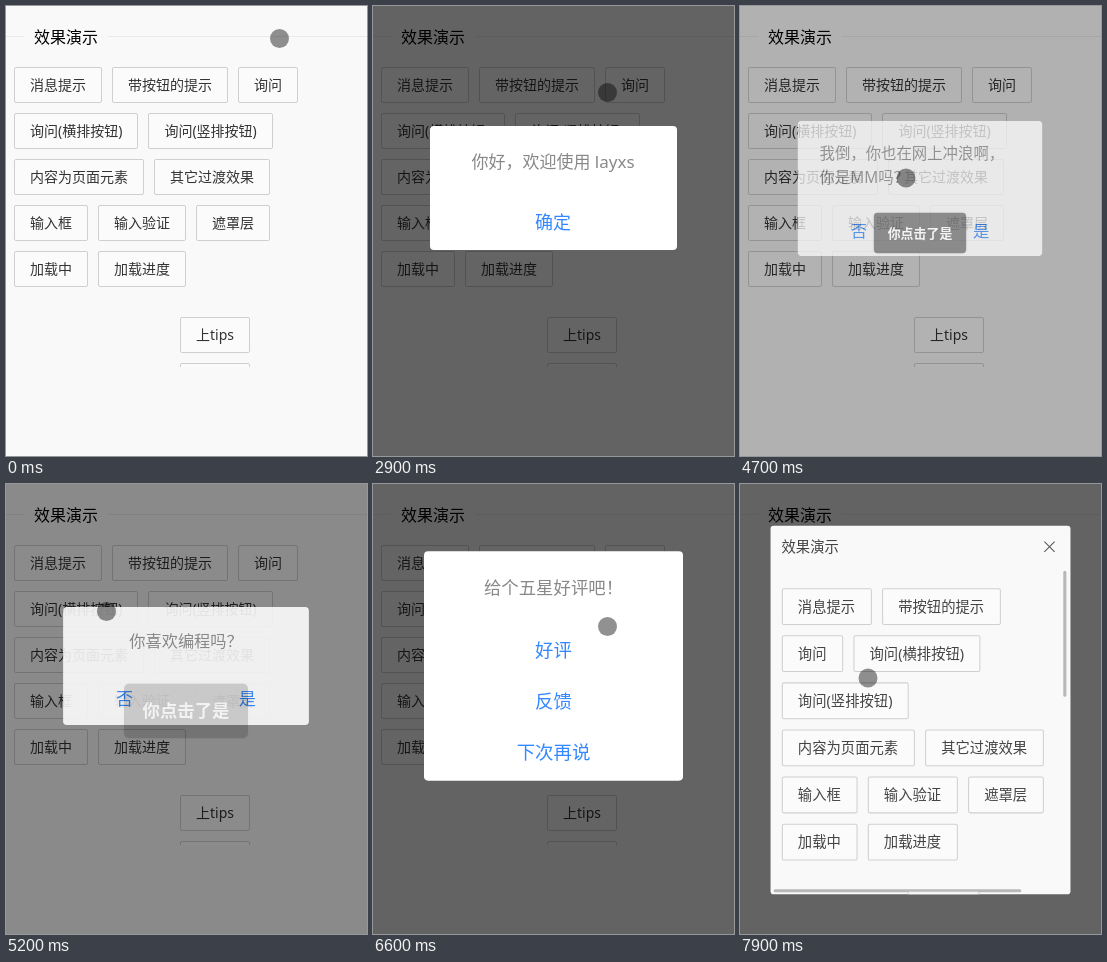
An HTML page that plays this animation: 361x450 px, repeating every 8000 ms.

```html
<!DOCTYPE html>
<html lang="zh-CN">
<head>
<meta charset="utf-8">
<title>效果演示</title>
<style>
* { box-sizing: border-box; }
html, body { margin: 0; width: 100%; height: 100%; overflow: hidden; background: #f9f9f9; }
#stage {
  position: relative; width: 361px; height: 450px; overflow: hidden; background: #f9f9f9;
  font: 14px/1 "Noto Sans", "Noto Sans CJK SC", "Noto Sans CJK", sans-serif; color: #333;
}
#stage div { position: absolute; white-space: nowrap; }
#list { left: 0; top: 0; width: 361px; height: 361px; overflow: hidden; }
.line { top: 30px; height: 1px; background: #e9e9e9; }
#head { left: 28px; top: 19px; font-size: 16px; line-height: 24px; color: #000; }
.row { display: flex; gap: 10px; height: 36px; }
#stage .btn {
  position: static; flex: none; padding: 0 15px; border: 1px solid #cfcfcf; border-radius: 2px;
  background: #fbfbfb; line-height: 34px;
}
#mask { inset: 0; background: #000; }
.dialog { border-radius: 4px; background: #fff; }
#stage .msg { left: 24px; right: 24px; top: 23px; font-size: 17px; line-height: 25.5px; color: #888; text-align: center; white-space: pre; }
#stage .msg.long { text-align: left; }
.act { height: 50px; line-height: 44px; font-size: 18px; color: #38f; text-align: center; }
#win { left: 33.5px; top: 46.4px; width: 292.6px; height: 360px; border-radius: 3px; background: #f9f9f9; overflow: hidden; color: #444; }
#win .name { left: 10.7px; top: 10px; line-height: 21px; }
#win svg { position: absolute; left: 266px; top: 14px; }
.bar { border-radius: 2px; background: #b8b8b8; }
.toast {
  top: 205px; height: 44px; border-radius: 4px; background: rgba(0,0,0,.8); color: #fff;
  line-height: 44px; text-align: center; font-weight: 700; box-shadow: 0 0 4px rgba(0,0,0,.12);
}
#dot { left: -9.5px; top: -9.5px; width: 19px; height: 19px; border-radius: 50%; background: rgba(0,0,0,.43); }
</style>
</head>
<body>
<div id="stage">
  <div class="line" style="left:0;width:18px"></div>
  <div class="line" style="left:102px;right:0"></div>
  <div id="head">效果演示</div>
  <div id="list"></div>
  <div id="mask"></div>
  <div id="win">
    <div class="name">效果演示</div>
    <svg width="13" height="13"><path d="M1.5 1.5l10 10m0-10l-10 10" stroke="#555"/></svg>
    <div class="bar" style="left:286px;top:44px;width:3px;height:123px"></div>
    <div class="bar" style="left:3px;top:354.5px;width:242px;height:3px"></div>
  </div>
</div>
<script>
const LOOP = 8000, STEP = 100;
const [stage, list, win, mask] = ['stage', 'list', 'win', 'mask'].map(id => document.getElementById(id));
const clamp = v => Math.min(1, Math.max(0, v));

function add(parent, cls, text = '', box = {}) {
  const el = document.createElement('div');
  el.className = cls;
  el.textContent = text;
  for (const k in box) el.style[k] = box[k] + 'px';
  parent.append(el);
  return el;
}

function addRows(parent, left, top, rows) {
  rows.forEach((labels, i) => {
    const row = add(parent, 'row', '', { left, top: top + i * 46 });
    labels.split(' ').forEach(s => add(row, 'btn', s));
  });
}

const common = ['内容为页面元素 其它过渡效果', '输入框 输入验证 遮罩层', '加载中 加载进度'];
addRows(list, 8, 61, ['消息提示 带按钮的提示 询问', '询问(横排按钮) 询问(竖排按钮)', ...common]);
addRows(list, 174, 311, ['上tips', '下tips']);
addRows(win, 10.7, 60.5, ['消息提示 带按钮的提示', '询问 询问(横排按钮)', '询问(竖排按钮)', ...common]);
addRows(win, 134, 357, ['上tips']);

function dialog(width, lines, acts, stacked) {
  const top = 48 + 25.5 * lines.length;
  const height = top + 50 * (stacked ? acts.length : 1);
  const el = add(stage, 'dialog', '', { left: 180 - width / 2, top: 182 - height / 2, width, height });
  add(el, lines.length > 1 ? 'msg long' : 'msg', lines.join('\n'));
  const w = stacked ? width : width / acts.length;
  acts.forEach((s, i) => add(el, 'act', s, stacked
    ? { left: 0, top: top + i * 50, width: w }
    : { left: i * w, top, width: w }));
  return el;
}

const toast = (text, width) => add(stage, 'toast', text, { left: 180.3 - width / 2, width });

// Element, opening time, closing time
const dialogs = [
  [dialog(247, ['你好，欢迎使用 layxs'], ['确定']), 2300, 3500],
  [dialog(270, ['我倒，你也在网上冲浪啊，', '你是MM吗？'], ['否', '是']), 3900, 4600],
  [dialog(258, ['你喜欢编程吗？'], ['否', '是']), 5100, 5800],
  [dialog(253, ['给个五星好评吧！'], ['好评', '反馈', '下次再说'], true), 6300, 7000],
  [win, 7600, LOOP]
];
const toasts = [
  [toast('你好，欢迎使用 layxs', 165), 400, 2200],
  [toast('你点击了是', 100), 4600, 5000],
  [toast('你点击了是', 100), 5800, 6200],
  [toast('非常感谢', 86), 7000, 7500]
];

// Pointer stops: arrival time, x, y
const stops = [
  [0, 273, 32], [300, 71.5, 79.5], [800, 188, 71.5], [3100, 326, 115], [3400, 226, 215],
  [3700, 292, 110], [3900, 265, 82], [4400, 241, 226], [4700, 165.5, 171.5], [4900, 100, 127],
  [5600, 244, 212], [6000, 274.5, 140.5], [6200, 215, 127], [6800, 272, 172],
  [7200, 268.5, 186], [7500, 75, 173], [7900, 127.5, 193.5]
];
const dot = add(stage, '');
dot.id = 'dot';

// Rises past 1 and settles
const back = u => 1 + 3 * (u - 1) ** 3 + 2 * (u - 1) ** 2;

// How far open a dialog is: 0 hidden, 1 at rest
function openness(t, open, close) {
  if (t <= open) return 0;
  return t <= close ? Math.max(0, back(clamp((t - open) / 500))) : (1 - clamp((t - close) / 235)) ** 1.3;
}

function pose(el, scale, opacity) {
  el.style.transform = `scale(${scale})`;
  el.style.opacity = opacity;
  el.style.visibility = opacity > 0 ? 'visible' : 'hidden';
}

function pointer(t) {
  const i = stops.findIndex(s => s[0] > t);
  if (i < 0) return stops[stops.length - 1].slice(1);
  const [t0, x0, y0] = stops[i - 1], [t1, x1, y1] = stops[i];
  const from = Math.max(t0, t1 - 300), p = clamp((t - from) / (t1 - from));
  return [x0 + (x1 - x0) * p, y0 + (y1 - y0) * p];
}

function draw(t) {
  let shade = 0;
  for (const [el, open, close] of dialogs) {
    const m = openness(t, open, close);
    pose(el, .815 + .185 * m, clamp(m) ** .45);
    shade = Math.max(shade, clamp(m));
  }
  mask.style.opacity = .6 * shade;
  // The window borrows the page's buttons
  list.style.visibility = t > dialogs[4][1] ? 'hidden' : 'visible';

  for (const [el, open, close] of toasts) {
    const u = clamp((t - open) / 500), out = clamp((t - close) / 250);
    pose(el, 1 + .3 * (back(u) - 1 + out), clamp(u * 2.5) * (1 - out));
  }
  const [x, y] = pointer(t);
  dot.style.transform = `translate(${x}px, ${y}px)`;
}

const start = performance.now();
function tick() {
  const t = Math.max(0, performance.now() - start + 8) % LOOP;
  draw(Math.floor(t / STEP) * STEP);
  requestAnimationFrame(tick);
}
draw(0);
requestAnimationFrame(tick);
</script>
</body>
</html>
```
